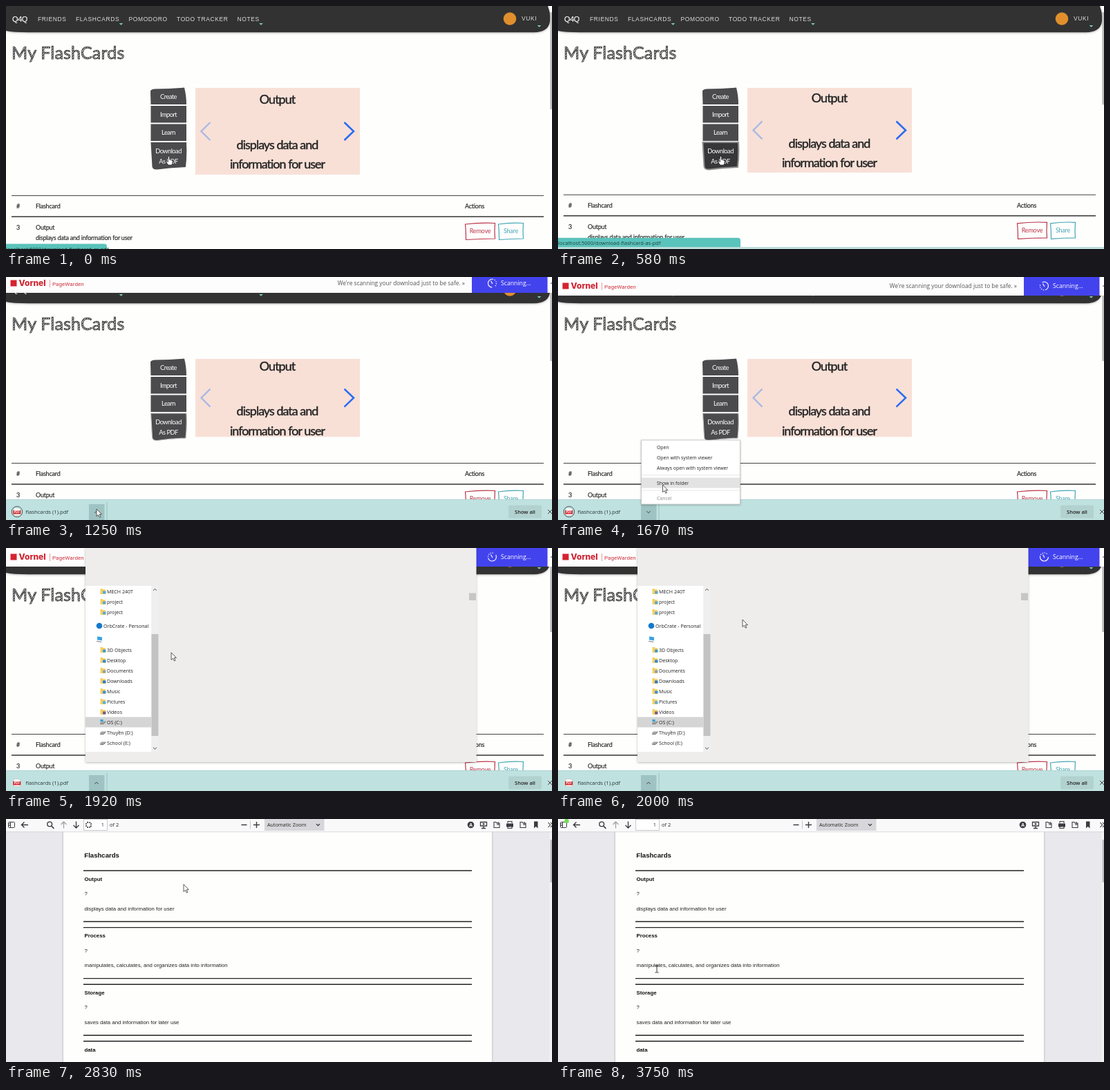
Write an HTML page that moves like this. It is 790 px wide and 353 px high and loops after 3.83 s.

```html
<!DOCTYPE html>
<html lang="en">
<head>
<meta charset="utf-8">
<title>Flashcards to PDF</title>
<style>
html, body { margin: 0; width: 100%; height: 100%; overflow: hidden; background: #fefefd; }
svg { display: block; width: 790px; height: 353px; }
text { white-space: pre; }
.ui { font-family: "Open Sans", sans-serif; }
.hand { font-family: Lato, sans-serif; }
.doc { font-family: "Liberation Sans", Arial, sans-serif; }
</style>
</head>
<body>
<svg id="stage" viewBox="0 0 790 353" xmlns="http://www.w3.org/2000/svg"></svg>
<script>
const LOOP = 3830;

// ---- drawing helpers ----
const attrs = o => Object.entries(o).map(([k, v]) => ` ${k}="${v}"`).join('');
const text = (cls, x, y, s, size, fill = '#222', o = {}) =>
  `<text class="${cls}" x="${x}" y="${y}" font-size="${size}" fill="${fill}"${attrs(o)}>${s}</text>`;
const rect = (x, y, w, h, fill, o = {}) =>
  `<rect x="${x}" y="${y}" width="${w}" height="${h}" fill="${fill}"${attrs(o)}/>`;
const dot = (x, y, r, fill, o = {}) => `<circle cx="${x}" cy="${y}" r="${r}" fill="${fill}"${attrs(o)}/>`;
const line = (d, stroke = '#333', w = 1, o = {}) =>
  `<path d="${d}" fill="none" stroke="${stroke}" stroke-width="${w}"${attrs(o)}/>`;
const shape = (d, fill, o = {}) => `<path d="${d}" fill="${fill}"${attrs(o)}/>`;
const group = (id, body, o = {}) => `<g id="${id}"${attrs(o)}>${body}</g>`;
const mid = { 'text-anchor': 'middle' };
const right = { 'text-anchor': 'end' };
const bold = { 'font-weight': 700 };
const tight = n => ({ 'letter-spacing': n });
const inked = (color, w) => ({ stroke: color, 'stroke-width': w });
const chevron = (x, y, r, dir = 1, color = '#444', w = 1) =>
  line(`M${x - r} ${y - dir * r / 2}l${r} ${dir * r}l${r} ${-dir * r}`, color, w);

// ---- web page ----
function navBar() {
  const links = [['FRIENDS', 46], ['FLASHCARDS', 101], ['POMODORO', 177.5], ['TODO TRACKER', 247], ['NOTES', 334.5], ['VUKI', 746]];
  return shape('M0 0H784Q789 13 786.5 25Q783 38 764 38.3H32Q10 38.2 0 36Z', '#323033', { filter: 'url(#soft)' }) +
    text('doc', 9, 22.5, 'Q4Q', 11, '#f4f4f4', { ...tight(-.4), ...inked('#f4f4f4', .2) }) +
    links.map(([s, x]) => text('doc', x, x > 700 ? 21 : 21.8, s, 8.5, '#dcdcdc', tight(.6))).join('') +
    [[166.5, 25], [369, 25], [771.5, 28]].map(([x, y]) => shape(`M${x - 2.8} ${y}h5.6l-2.8 2.8z`, '#7fd0c4')).join('') +
    dot(729, 18.5, 9.3, '#e08f2c');
}

function menuButtons() {
  const label = (s, y) => text('hand', 235, y, s, 9.3, '#fff', { ...mid, ...tight(-.55) });
  return shape('M209 124Q209 121 215 120.5Q238 120 258 118.5Q261 130 261 143H209.5Z', '#4b4a4c') +
    rect(209.5, 145, 51.5, 24.5, '#4b4a4c') + rect(209.5, 171.5, 51.5, 24.5, '#4b4a4c') +
    shape('M209.5 198H261Q262 218 260 234Q238 235 219 237.5Q212 238 211.5 233Z', '#4b4a4c', { id: 'pdfBtn' }) +
    label('Create', 134.5) + label('Import', 160.5) + label('Learn', 187) + label('Download', 213.5) + label('As PDF', 228.5);
}

function card() {
  const big = (s, y) => text('hand', 392.5, y, s, 18, '#222', { ...mid, ...tight(-1), ...inked('#222', .4) });
  return rect(274, 119, 238, 126, '#f8e0d7', { id: 'cardBox' }) +
    group('cardText', big('Output', 142) + big('displays data and', 207.5) + big('information for user', 236) +
      line('M295.5 169l-13 13l13 13', '#abb9e2', 2.4) + line('M489.5 169l13.5 13l-13.5 13', '#2b6cf0', 2.6));
}

function table() {
  const cell = (s, x, y) => text('hand', x, y, s, 9, '#222', { ...tight(-.22), ...inked('#222', .15) });
  const outlined = (s, x, w, color) =>
    line(`M${x} 317Q${x + w / 2} 314.5 ${x + w} 315.5Q${x + w - 1} 328 ${x + w} 338Q${x + w / 2} 338 ${x + 1} 339.5Q${x + 1} 326 ${x} 317Z`, color, 1.2) +
    text('hand', x + w / 2, 330.3, s, 9, color, { ...mid, ...tight(-.2) });
  return group('table', line('M8 275.5H778', '#444', 1) + line('M8 306H778', '#333', 1.5) +
    cell('#', 15, 294) + cell('Flashcard', 43, 294) + cell('Actions', 664, 294) +
    cell('3', 15, 325) + cell('Output', 43, 325) + cell('displays data and information for user', 43, 340) +
    outlined('Remove', 664.5, 43, '#bb3549') + outlined('Share', 712.5, 36, '#45a6b4'));
}

const page = () => navBar() +
  text('hand', 8, 76.5, 'My FlashCards', 25, 'url(#hatch)', { ...tight(.2), ...inked('#333', .75) }) +
  menuButtons() + card() + table() +
  rect(787.3, 9, 2.7, 141, '#bdbdbd', { id: 'thumb' }) +
  group('bubble', shape('M0 309.5H260Q264 309.5 264 313V323H0Z', '#5ac3bb', { id: 'bubbleBox' }) +
    text('ui', 0, 319.5, 'localhost:5000/download-flashcard-as-pdf', 7.4, '#203a3a', tight(.1)));

// ---- browser chrome ----
const downloads = () => group('shelf',
  rect(0, 323, 790, 32, '#bfe2e0') + line('M0 323.4H790', '#a8cfcd', .7) +
  rect(120, 330, 22.5, 23, '#9ec3c2', { id: 'arrowBg' }) +
  shape('M11.5 335.5h6.5l3 3v8h-9.5z', '#fff', inked('#b9a9a9', .5)) +
  rect(10.2, 339, 11, 5.4, '#d2262c') + text('ui', 15.7, 343.3, 'PDF', 4.3, '#fff', { ...mid, ...bold }) +
  dot(16, 341, 7.8, 'none', { id: 'ring', ...inked('#4d5f63', 1) }) +
  text('ui', 28.5, 344.3, 'flashcards (1).pdf', 7.7, '#263434') +
  group('itemEnd', line('M146 327V353', '#93b8b6', .8) + group('arrowUp', chevron(131, 341.5, 2.7, -1)) + group('arrowDown', chevron(131, 341.5, 2.7))) +
  rect(727, 331.5, 48, 19, '#b2d2d0', { rx: 2 }) + text('ui', 751, 344, 'Show all', 7.5, '#222', { ...mid, 'font-weight': 600 }) +
  line('M784 338l6 6m0-6l-6 6', '#444', 1)) +
  group('drop', dot(20, 327, 22, '#cfe8ee', { opacity: .4 }) + shape('M17.5 321h5v6h4l-6.5 6.5l-6.5-6.5h4z', '#63a9d6', { opacity: .85 }));

const scanBar = () => group('scan',
  rect(0, 0, 790, 27, '#fdfdfd') + rect(6.5, 8.5, 9, 9, '#d5232f') +
  text('', 18.5, 17, 'Vornel', 12, '#cf2632', { 'font-weight': 800, 'font-family': 'Inter, sans-serif' }) +
  line('M63.5 8V19', '#d77', .7) +
  text('', 67, 16.8, 'PageWarden', 8.1, '#cf3540', { 'font-family': 'Roboto, sans-serif' }) +
  text('ui', 664, 16.4, 'We\'re scanning your download just to be safe. »', 8.35, '#555', right) +
  rect(674, 0, 109.5, 27, '#4343ee') +
  group('spin', dot(703.5, 13, 6, 'none', { ...inked('#fff', 1.1), 'stroke-dasharray': '20 1.6 1.4 1.6 1.4 1.6 1.4 1.6 1.4 6' })) +
  line('M701.5 9.5l2.4 4.6', '#fff', 1.1) + text('ui', 716, 16.4, 'Scanning...', 8.7, '#fff') +
  line('M788 12l2 2m0-2l-2 2', '#777', .7));

function fileMenu() {
  const item = (s, y, c = '#222') => text('ui', 143, y, s, 6.9, c);
  return group('menu', rect(120.5, 237, 143, 93, '#fff', { ...inked('#bbb', .7), filter: 'url(#soft)' }) +
    rect(121, 291.5, 142, 15, '#e3e3e3', { id: 'menuRow' }) + line('M121 287.8H263M121 310H263', '#ddd', .7) +
    item('Open', 249.7) + item('Open with system viewer', 264.8) + item('Always open with system viewer', 279.7) +
    item('Show in folder', 301.7) + item('Cancel', 323.6, '#888'));
}

// ---- file manager ----
const folder = (x, y, accent) => shape(`M${x} ${y - 4}h3l1 1.3h3.5v6.7h-7.5z`, '#f5cf62') +
  (accent ? rect(x + 3.6, y - .5, 4.4, 4, accent) : '');
const drive = (x, y, top) => shape(`M${x - 4.5} ${y + 1}l3-2.5h6.5l-2.5 3.5l-4 1z`, '#a5a5a5') +
  line(`M${x - 4} ${y + 2.6}h5l3-3.4`, '#666', .8) + (top ? rect(x - 3.5, y - 4, 4, 3, top) : '');

function sidePane() {
  const rows = [['MECH 240T', 63, '#58a8d0'], ['project', 78, '#58a8d0'], ['project', 93, '#58a8d0'], ['3D Objects', 148, '#3f9ad0'], ['Desktop', 163, '#2f8ad8'],
    ['Documents', 178, '#8ca0b0'], ['Downloads', 193, '#2a78c8'], ['Music', 208, '#3a8fd6'], ['Pictures', 223, '#57b0d8'], ['Videos', 238, '#755a8a']];
  const drives = [['OS (C:)', 253, '#2aa5dc'], ['Thuyền (D:)', 268], ['School (E:)', 283]];
  const label = (s, y, x = 146) => text('ui', x, y + 2.7, s, 7.1, '#222');
  return rect(115, 55, 95.5, 241, '#fff') + rect(115, 245.5, 95.5, 15, '#d5d5d5') +
    rows.map(([s, y, c]) => folder(136.5, y, c) + label(s, y)).join('') +
    drives.map(([s, y, c]) => drive(140, y, c) + label(s, y)).join('') +
    dot(135, 113, 4.3, '#1478cf') + label('OrbCrate - Personal', 113, 141) +
    shape('M132 128.5l7 1v5l-7-1z', '#3aa3e0') + line('M131 135.5l7 1', '#777', 1) +
    rect(210.5, 55, 10, 241, '#efefef') + rect(210.5, 125, 10, 148, '#c3c3c3') +
    chevron(215.5, 60.5, 2.4, -1) + chevron(215.5, 291, 2.4);
}

function ribbon() {
  const label = (s, x, y, c = '#333') => text('ui', x, y, s, 6.9, c, mid);
  const left = (s, x, y, c = '#333') => text('ui', x, y, s, 6.9, c);
  const two = (a, b, x, c) => label(a, x, 7, c) + label(b, x, 16, c);
  const caret = (x, y) => shape(`M${x - 2} ${y}h4l-2 2.2z`, '#555');
  return rect(115, 0, 565, 34, '#f5f5f5') +
    two('Pin to Quick', 'access', 138) + label('Paste', 197, 7) +
    rect(213.5, 7, 5, 6, '#d4d4d4') + left('Paste shortcut', 222, 12.5, '#999') +
    two('Move', 'to', 286, '#999') + caret(293, 13) + two('Copy', 'to', 313, '#999') + caret(320, 13) +
    label('Delete', 344, 7) + caret(345, 12) + label('Rename', 371, 7, '#999') + two('New', 'folder', 403) +
    label('Properties', 493, 7) + caret(493, 12) + rect(515, 7, 5, 7, '#e6c98c') + left('History', 523, 13.5) +
    rect(558, 7, 3.5, 3.5, '#4a9be0') + rect(561, 10, 3.5, 3.5, '#4a9be0') + left('Invert selection', 568, 12.5) +
    [['Clipboard', 193], ['Organize', 329], ['New', 431], ['Open', 513], ['Select', 585]].map(([s, x]) => label(s, x, 28.5, '#666')).join('') +
    line('M273.5 0V31M388.5 0V31M473.5 0V31M551.5 0V31M618.5 0V31', '#dedede', .8) + line('M115 34H680', '#e2e2e2', .8);
}

function address() {
  const crumbs = [['OS (C:)', 220], ['Users', 254], ['kelmi', 284], ['Downloads', 313]];
  return line('M131 44h-7m3-3l-3 3l3 3M141 44h7m-3-3l3 3l-3 3', '#b5b5b5', .9) + chevron(159, 44, 2, 1, '#999') +
    line('M173 48v-8m-3 3l3-3l3 3', '#444', .9) +
    line('M180 36.5H465.5V52.5H180ZM443.5 36.5V52.5M469 36.5H672V52.5H469Z', '#e6e6e6', .8) + folder(183.5, 44, '#2a78c8') +
    crumbs.map(([s, x]) => text('ui', x, 46.8, s, 6.9, '#222') + line(`M${x - 9} 42l2 2l-2 2`, '#777', .7)).join('') +
    chevron(435, 44, 2.4) + line('M457.6 42.5a3.2 3.2 0 1 0 .5 2M458 40v3h-3', '#444', .9) +
    dot(480.5, 43, 2.4, 'none', inked('#555', .8)) + line('M478.8 44.8l-2.5 2.7', '#555', .9) +
    text('ui', 491.5, 46.8, 'Search Downloads', 6.9, '#666');
}

function files() {
  const head = (s, y, end) => chevron(230, y - 3, 2, 1, '#556') + text('ui', 236, y, s, 7.1, '#26409a') + line(`M${end} ${y - 3}H666`, '#ddd', .8);
  const name = (x, y, ...rows) => rows.map((s, i) => text('ui', x, y + i * 9.8, s, 7, '#222', mid)).join('');
  const paper = (x, y, w, h) => rect(x, y, w, h, '#fff', inked('#ccc', .7));
  const strip = (x, y, h) => paper(x, y, 50, h) + rect(x, y, 50, 2, '#d0d0d4') +
    line(`M${x + 3} ${y + 6}h44M${x + 3} ${y + h - 3}h42`, '#c9c9c9', .7);
  const shot = (x, skin) => paper(x, 102, 50, 24) + rect(x, 102, 50, 3, '#d5d5da') + rect(x, 105, 50, 2.5, '#333') + skin;
  let ruled = '';
  for (let y = 79; y < 122; y += 4) ruled += `M247 ${y}h28M247 ${y + 1.6}h${10 + y % 9}`;
  const stripeCard = (y, c) => rect(311, y, 25, 8, c);
  const zip = shape('M243 200l3-2h13l3 2h19v43h-38z', '#f8dc7b') + rect(262, 200, 9, 43, '#e3c766') +
    line('M266.5 200V243', '#8a7a48', 2.2, { 'stroke-dasharray': '1.5 1.5' }) + rect(264, 221, 5, 8, '#b4b4b4');
  return rect(221, 55, 449, 241, '#fff') +
    head('Today (8)', 68.5, 270) + head('Yesterday (4)', 187.7, 281) + head('Last week (13)', 279.7, 287) +
    rect(236, 72, 52, 76, '#cfe6fa', { id: 'picked' }) + paper(244, 75, 35, 48) + line(ruled, '#777', .7) + dot(282, 121.5, 4.8, '#1b8fc6') + name(261.5, 135, 'flashcards', '(1).pdf') +
    rect(295, 73.5, 56, 66.5, 'none', inked('#dcecf8', .8)) +
    shot(298, rect(320, 111, 21, 10, '#f6e6d0') + rect(325, 111, 4, 8, '#dd8060') + rect(334, 114, 5, 6, '#5b9fb8') + rect(301, 112, 13, 2, '#aaa') + rect(298, 124, 50, 2, '#555')) + name(324, 135, 'showcard1.gif') +
    shot(360.5, rect(366, 111, 6, 11, '#555') + rect(375, 111, 25, 11, '#f7dccf') + rect(381, 115, 12, 1.5, '#777')) + name(385.5, 135, 'learncard1.gif') +
    strip(423, 103, 23) + rect(423, 103, 50, 3, '#b3b3b5') + name(448, 135, 'importcard1.gi', 'f') +
    [[486, 'addcard.gif'], [548, 'image 11.png']].map(([x, s]) => strip(x, 110, 16) + name(x + 25, 135, s)).join('') +
    strip(610, 110, 16) + rect(610, 112, 50, 1.5, '#f0b080') + name(635.5, 135, 'ovpix.com-gif-', 'maker.gif') +
    strip(236, 151, 12) + name(261, 172.6, 'image 10.png') +
    zip + name(261.5, 254.5, 'Bramlow.zip') +
    paper(308, 194, 31, 51) + rect(310, 196, 13, 3, '#777') + stripeCard(205, '#f3c6c2') + stripeCard(219, '#f6d3cb') + stripeCard(233, '#bfe3d4') +
    dot(344, 241, 4.8, '#1b8fc6') + name(323.5, 254.5, 'Untitled', '(1).pdf') +
    dot(386, 220.5, 26.3, '#1b8fc6') + name(386, 254.5, 'Vector 4.svg') + dot(448, 220.5, 26.3, '#1b8fc6') + name(448, 254.5, '5545 1.svg') +
    line('M559 296v-5h24l6 5M561 294.5h18', '#777', .9) + line('M617 296v-9h37v9M620 291h12M638 293h8', '#ccc', .8);
}

const explorer = () => group('explorer',
  rect(115, 0, 565.5, 311, '#eeedec', { filter: 'url(#soft)' }) +
  group('full', rect(115, 34, 565, 277, '#fff') + ribbon() + address()) +
  sidePane() +
  group('content', files() + rect(670, 55, 10, 241, '#f1f1f1') + chevron(675, 60.5, 2.4, -1) + chevron(675, 291, 2.4) +
    text('ui', 124, 306.5, '869 items', 7, '#333') + line('M653 301h8M653 303.5h8M653 306h8', '#888', .8) + rect(666, 299.5, 10, 8, '#cfe6f7') + rect(668, 301.5, 6, 4, '#3a80b5')) +
  rect(670, 65.5, 10, 10.5, '#c6c6c6'));

// ---- PDF viewer ----
function toolbar() {
  const ink = '#3b3b42';
  const tray = x => line(`M${x - 4} 4.5h3l1 1.5h4v6.5h-8zM${x} 8h4m-2-4v4`, ink, 1.1);
  return rect(0, 0, 790, 18.5, '#f9f9fa') + line('M0 18.7H790', '#cfcfd3', .7) +
    rect(3.5, 4.5, 9, 8, 'none', { stroke: ink, rx: 1 }) + line('M6.5 4.5V12.5M4 7h2M4 9.5h2', ink, 1) +
    line('M32 8.5H22.5m4-4l-4 4l4 4', ink, 1.4) +
    dot(63.2, 7.5, 3.4, 'none', inked(ink, 1.4)) + line('M65.6 10l3.8 3.8', ink, 1.7) +
    line('M83.5 13.5V4m-4 4l4-4l4 4', '#a0a0a5', 1.3) + line('M101.5 3.5V13m-4-4l4 4l4-4', ink, 1.3) +
    rect(112.5, .5, 34, 16, '#fff', inked('#bcbcc1', .8)) + text('ui', 142, 11.2, '1', 7.4, '#222', right) + text('ui', 150, 11.2, 'of 2', 7.4) +
    line('M340.5 8.5h8M358 8.5h9M362.5 4v9', ink, 1.4) + line('M353.5 2.5V14.5', '#bbb', .8) +
    rect(374, 0, 86.5, 17, '#d7d7db') + text('ui', 378, 11.2, 'Automatic Zoom', 7.3) + chevron(451.5, 8.5, 2.4, 1, ink, 1.3) +
    dot(672.5, 8.5, 4.8, ink) + text('ui', 672.5, 11, 'A', 6.8, '#fff', { ...mid, ...bold }) +
    line('M686.5 4.5h9v5.5h-9zM691 10v3.5m-3 0h6', ink, 1.3) + shape('M689.8 5.5l3.4 1.8l-3.4 1.8z', ink) +
    tray(710) + shape('M724 6.5h10v5h-10z', ink) + line('M726 6V3.5h6V6M726 9.5v4h6v-4', ink, 1.1) + tray(748) +
    shape('M764 3.5h5.5v10l-2.8-2.4l-2.7 2.4z', ink) + line('M784.5 5l3 3.5l-3 3.5m3.5-7l3 3.5l-3 3.5', ink, 1.1) +
    group('load', dot(119.5, 8.5, 3.8, 'none', { ...inked('#333', 1.8), 'stroke-dasharray': '1.7 1.28' })) +
    dot(12.5, 3, 3.3, '#73dc58', { id: 'notice' });
}

function pages() {
  const cards = [['Output', 'displays data and information for user'], ['Process', 'manipulates, calculates, and organizes data into information'],
    ['Storage', 'saves data and information for later use'], ['data', '']];
  return rect(83, 10, 620, 350, '#fefefd', { filter: 'url(#soft)' }) + group('pageText',
    text('doc', 113.3, 56, 'Flashcards', 9.6, '#111', bold) +
    cards.map(([term, def], i) => {
      const y = 75 + i * 82.6;
      return line(`M112 ${y}H674M112 ${y + 74}H674`, '#222', 1.4) + text('doc', 113.5, y + 14.7, term, 7.8, '#111', bold) +
        text('doc', 113.5, y + 36, '?', 7.8) + text('doc', 113.5, y + 57.8, def, 7.8);
    }).join(''));
}

const viewer = () => group('viewer', rect(0, 0, 790, 353, '#e9e8ec') + pages() +
  rect(786.5, 19, 3.5, 334, '#f2f2f3') + rect(787.5, 30, 2.5, 62, '#bcbcc0') + toolbar());

const pointers = () =>
  group('pointer', shape('M0 0V10.6L2.5 8.4L4.3 12.2L6 11.4L4.2 7.7H7.4Z', '#fff', inked('#333', .8))) +
  group('finger', shape('M-1.1 .8Q0-.8 1.1 .8V4.6L4.8 5.6Q6 6.2 5.7 8L4.5 12.5H-.8L-3.8 8Q-3.8 6.6-2.5 7L-1.1 8.2Z', '#fff', inked('#222', .7))) +
  group('beam', line('M-2.5 0H-.7L0 .6L.7 0H2.5M0 .6V9.4M-2.5 10H-.7L0 9.4L.7 10H2.5', '#222', .9));

const stage = document.getElementById('stage');
stage.innerHTML = `<defs><filter id="soft" x="-5%" y="-10%" width="110%" height="130%"><feDropShadow dx="0" dy=".8" stdDeviation="1.6" flood-opacity=".3"/></filter>
<pattern id="hatch" width="2.4" height="2.4" patternUnits="userSpaceOnUse" patternTransform="rotate(40)"><rect width="2.4" height="2.4" fill="#fff"/><rect width="1.5" height="2.4" fill="#444"/></pattern></defs>` +
  rect(0, 0, 790, 353, '#fefefd') + page() + downloads() + scanBar() + fileMenu() + explorer() + viewer() + pointers();

// ---- motion ----
const el = {};
stage.querySelectorAll('[id]').forEach(e => el[e.id] = e);
const show = (id, on) => el[id].style.display = on ? '' : 'none';
const set = (id, o) => { for (const k in o) el[id].setAttribute(k, o[k]); };
const move = (id, x, y) => set(id, { transform: `translate(${x} ${y})` });
const ramp = (t, a, b) => Math.min(1, Math.max(0, (t - a) / (b - a)));
const ease = p => p * p * (3 - 2 * p);
const between = (t, a, b) => t >= a && t < b;

// time, x, y of the pointer tip
const path = [[0, 235.5, 218.5], [920, 235.5, 218.5], [1170, 131, 337], [1330, 131, 337], [1580, 150, 300], [1670, 151.5, 302],
  [1750, 151.5, 302], [2000, 267, 104], [2250, 276, 98], [2420, 290, 87], [2580, 262, 98], [2750, 261, 97], [2830, 257, 95],
  [3000, 257, 95], [3250, 175, 70], [3500, 140, 130], [3580, 122, 205], [3670, 150, 240], [3750, 143, 213]];
function tip(t) {
  const i = path.findIndex(p => p[0] > t);
  if (i < 0) return path[path.length - 1].slice(1);
  const [a, b] = [path[i - 1], path[i]], p = ease(ramp(t, a[0], b[0]));
  return [a[1] + (b[1] - a[1]) * p, a[2] + (b[2] - a[2]) * p];
}

// twelve pictures a second, on a 10 ms grid
const tick = n => Math.round(n * 25 / 3) * 10;
function snap(ms) {
  let n = Math.ceil(ms / 83);
  while (tick(n) > ms) n--;
  return tick(n);
}

function draw(t) {
  const k = ease(ramp(t, 500, 750));
  set('cardBox', { height: 126 - 12.7 * k });
  move('cardText', 0, -6.4 * k);
  move('table', 0, -5 * k);
  set('thumb', { height: 141 - 28 * k });
  const drop = 36 * (1 - k);
  move('shelf', 0, drop);
  move('bubble', 0, drop);
  set('bubbleBox', { d: `M0 309.5H${t < 580 ? 142 : 260}q4 0 4 3.5V323H0Z` });
  show('bubble', t < 1000);

  const hot = between(t, 330, 1000);
  set('pdfBtn', { fill: hot ? '#373638' : '#4b4a4c', stroke: t < 330 ? 'none' : hot ? '#8f8f8f' : '#c4c4c4', 'stroke-width': hot ? 2 : 1.2 });

  show('drop', between(t, 670, 1080));
  set('drop', { opacity: 1 - ramp(t, 830, 1080) });
  move('drop', 0, 14 * (ramp(t, 670, 1000) - .485));
  move('itemEnd', -17.5 * (1 - ease(ramp(t, 830, 1000))), 0);
  show('ring', !between(t, 1830, 2330));
  show('arrowBg', between(t, 1250, 2250));
  const open = between(t, 1330, 1830);
  show('menu', open);
  show('menuRow', t >= 1580);
  show('arrowDown', open);
  show('arrowUp', !open);

  show('scan', t >= 1080);
  move('scan', 0, -27 * (1 - ease(ramp(t, 1000, 1330))));
  set('spin', { transform: `rotate(${t * .36} 703.5 13)` });

  show('explorer', t >= 1830);
  set('explorer', { opacity: .5 + .5 * ramp(t, 1830, 1920) });
  show('full', t >= 2080);
  show('content', t >= 2170);
  show('picked', t >= 2580);

  show('viewer', t >= 2670);
  show('pageText', t >= 2750);
  show('load', t < 3080);
  set('load', { transform: `rotate(${t * .4} 119.5 8.5)` });
  show('notice', t >= 3080);

  const kind = t < 1000 ? 'finger' : t >= 3580 ? 'beam' : 'pointer';
  const [x, y] = tip(t);
  for (const id of ['finger', 'beam', 'pointer']) show(id, id === kind);
  move(kind, x, y);
}

const begin = performance.now();
function loop() {
  draw(snap((performance.now() - begin) % LOOP));
  requestAnimationFrame(loop);
}
loop();
</script>
</body>
</html>
```
